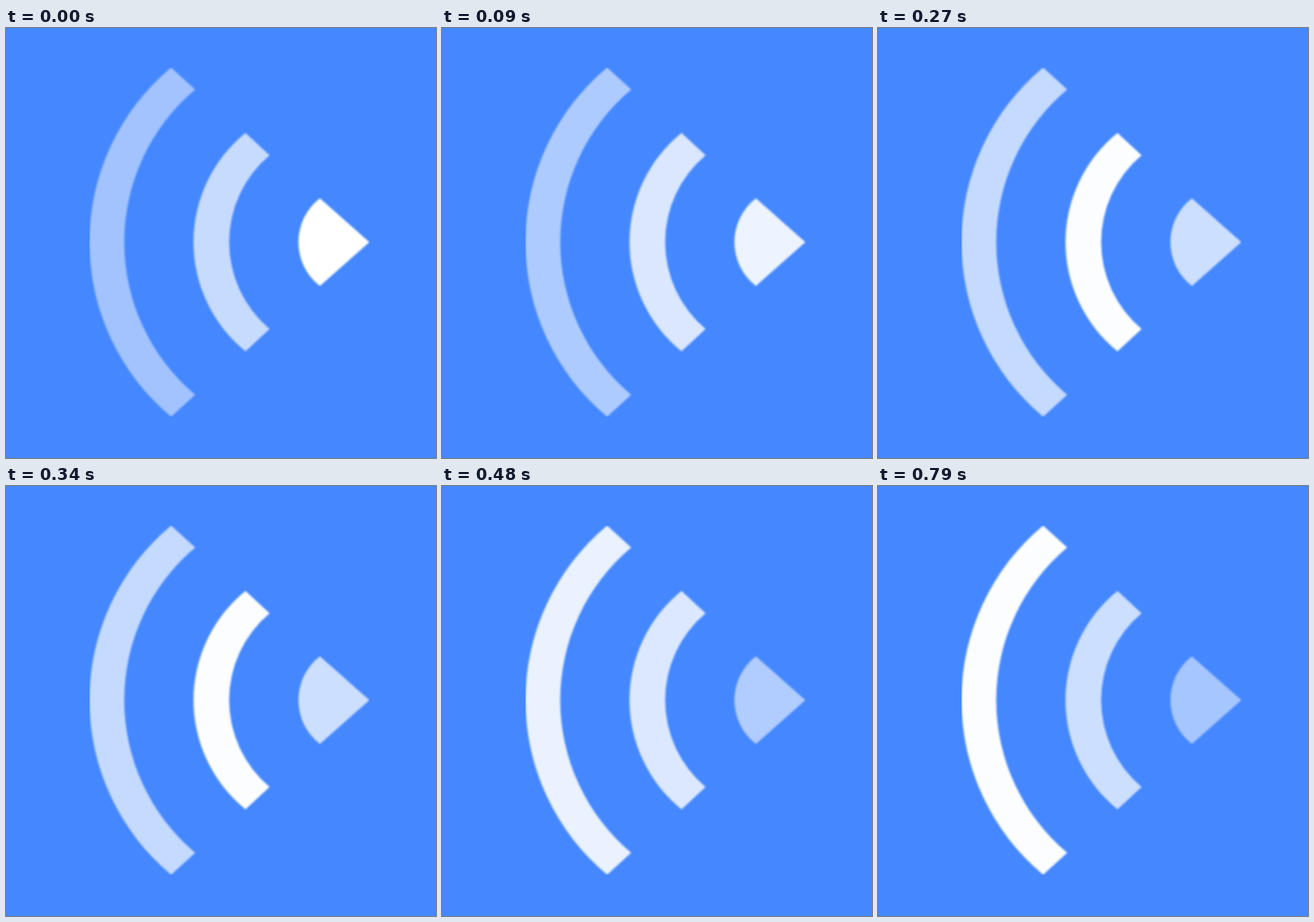
Recreate the animation shown at these times as an HTML page. Size 500 by 500 pixels, loop 930 ms.

```html
<!DOCTYPE html>
<html lang="en">
<head>
<meta charset="utf-8">
<title>Signal waves</title>
<style>
  html, body { margin: 0; width: 100%; height: 100%; overflow: hidden; background: #4487ff; }
  svg { display: block; width: 100vw; height: 100vh; }
  path { fill: #fff; }
</style>
</head>
<body>
<svg viewBox="0 0 500 500">
  <defs>
    <filter id="soft" filterUnits="userSpaceOnUse" x="0" y="0" width="500" height="500">
      <feGaussianBlur stdDeviation="0.8"/>
    </filter>
    <clipPath id="edge"><rect x="97" y="46" width="326" height="406"/></clipPath>
  </defs>
  <g clip-path="url(#edge)">
    <g filter="url(#soft)">
      <path id="outer"/>
      <path id="middle"/>
      <path id="tip"/>
    </g>
  </g>
</svg>
<script>
const CY = 249;
const LOOP = 930;
const STARTS = [0, 90, 180, 270, 390, 480, 570];

const GLOW = {
  outer:  [0.50, 0.57, 0.63, 0.69, 0.79, 0.885, 0.98],
  middle: [0.70, 0.80, 0.885, 0.98, 0.90, 0.81, 0.73],
  tip:    [1.00, 0.90, 0.815, 0.73, 0.65, 0.58, 0.52]
};

// Radius of a circular arc from its half chord and its depth.
const radius = (half, depth) => (half * half + depth * depth) / (2 * depth);

// Arc bulging left to x = left, with both ends at x = end, CY ± half.
function arc(left, end, half, up) {
  const r = radius(half, end - left);
  return `A${r} ${r} 0 0 ${up ? 1 : 0} ${end} ${CY + (up ? -half : half)}`;
}

function band(out, inn) {
  const [, ox, oh] = out, [, ix, ih] = inn;
  return `M${ox} ${CY - oh}${arc(...out, false)}L${ix} ${CY + ih}${arc(...inn, true)}Z`;
}

const shapes = {
  outer: band([97, 192, 203], [137.5, 220, 177.5]),
  middle: band([218, 278.5, 127], [259.5, 306.5, 101]),
  tip: `M365 ${CY - 51}${arc(340, 365, 51, false)}L422.5 ${CY}Z`
};

const parts = Object.keys(shapes).map(id => {
  const el = document.getElementById(id);
  el.setAttribute("d", shapes[id]);
  return { el, glow: GLOW[id] };
});

function draw(time) {
  const t = time % LOOP;
  const step = STARTS.filter(s => s <= t).length - 1;
  for (const { el, glow } of parts) el.setAttribute("fill-opacity", glow[step]);
}

const began = performance.now();
function tick() {
  draw(performance.now() - began);
  requestAnimationFrame(tick);
}
tick();
</script>
</body>
</html>
```
